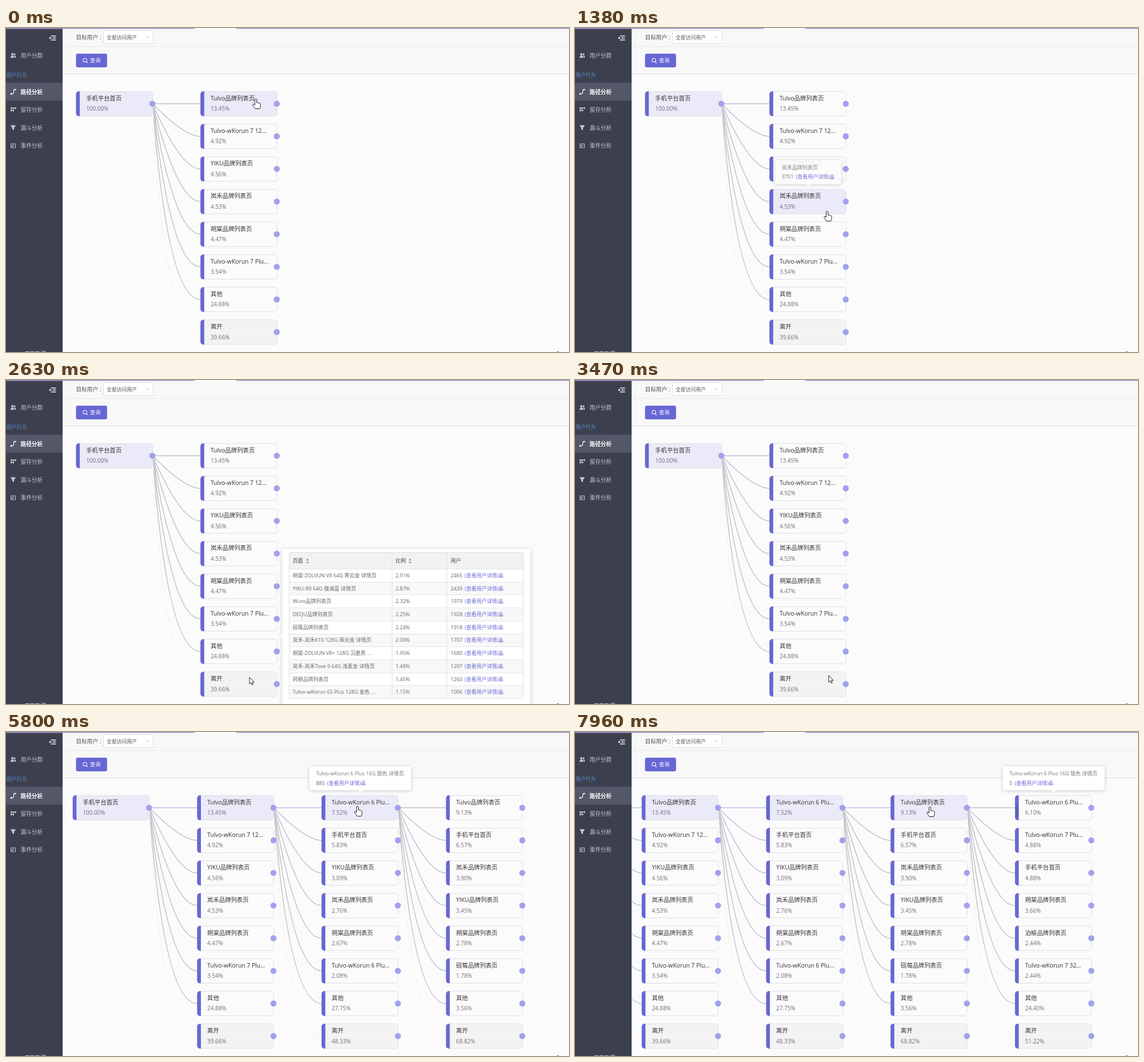
These frames come from a looping animation (985x568 px, 8000 ms). An HTML page with a canvas:

```html
<!DOCTYPE html>
<html lang="zh-CN">
<head>
<meta charset="utf-8">
<title>路径分析</title>
<style>
html, body { margin: 0; width: 100%; height: 100%; overflow: hidden; background: #fbfbfb; }
canvas { display: block; width: 985px; height: 568px; }
</style>
</head>
<body>
<canvas id="stage" width="985" height="568"></canvas>
<script>
const ctx = document.getElementById('stage').getContext('2d');
const LOOP = 8000, PITCH_X = 217.7, PITCH_Y = 57.2, TOP = 111, CARD_W = 134, CARD_H = 43;
const HOVER_LAG = 90, SMALL = 9;
const PURPLE = '#6767d5', DOT = '#a1a1ed', LINK = '#6a6ad8';
const FONT = '"Open Sans", "Noto Sans CJK SC", "Noto Sans CJK", sans-serif';

const list = brand => brand + '品牌列表页';
const HOME = '手机平台首页', A = list('Tulvo'), V = list('YIKU'), H = list('岚禾'), S = list('朔棠'), M = list('砚莓');
const phone = model => 'Tulvo-wKorun ' + model;
const column = (titles, rates) => [...titles, '其他', '离开'].map((title, i) => ({ title, rate: rates.split(' ')[i] + '%' }));
const COLUMNS = [
  [{ title: HOME, rate: '100.00%' }],
  column([A, phone('7 12...'), V, H, S, phone('7 Plu...')], '13.45 4.92 4.56 4.53 4.47 3.54 24.88 39.66'),
  column([phone('6 Plu...'), HOME, V, H, S, phone('6 Plu...')], '7.52 5.83 3.09 2.76 2.67 2.08 27.75 48.33'),
  column([A, HOME, H, V, S, M], '9.13 6.57 3.90 3.45 2.78 1.78 3.56 68.82'),
  column([phone('6 Plu...'), phone('7 Plu...'), HOME, S, list('泊榆'), phone('7 32...')], '6.10 4.88 4.88 3.66 2.44 2.44 24.40 51.22')
];
const SILVER = phone('6 Plus 16G 银色 详情页');

// column, row, title, users, shown from, shown until
const TIPS = [
  [1, 0, A, 9695, 70, 400],
  [1, 1, phone('7 128G 黑色 详情页'), 4074, 520, 900],
  [1, 2, V, 3776, 940, 1150],
  [1, 3, H, 3751, 1160, 1700],
  [1, 4, S, 3702, 1780, 2000],
  [1, 5, phone('7 Plus 128G 黑色 详情页'), 2931, 2040, 2200],
  [1, 3, H, 3751, 4020, 4180],
  [1, 0, A, 9695, 4420, 5060],
  [2, 0, SILVER, 885, 5300, 6190],
  [3, 0, A, 82, 6500, 6900],
  [4, 0, SILVER, 5, 7030, LOOP]
];
const TABLE = [
  ['朔棠-ZOLVUN V8 64G 霁云金 详情页', '2.91%', 2465],
  ['YIKU-R9 64G 微澜蓝 详情页', '2.87%', 2439],
  [list('Wuro'), '2.32%', 1979],
  [list('DEQU'), '2.25%', 1928],
  [M, '2.24%', 1918],
  ['岚禾-岚禾K10 128G 琢光金 详情页', '2.00%', 1707],
  ['朔棠-ZOLVUN V8+ 128G 沉墨黑 ...', '1.95%', 1680],
  ['岚禾-岚禾Tove 9 64G 浅麦金 详情页', '1.48%', 1297],
  [list('珂穆'), '1.45%', 1260],
  [phone('6S Plus 128G 金色 ...'), '1.15%', 1006]
];
const CURSOR = [
  [0, 437, 124], [70, 437, 126], [450, 438, 152], [840, 440, 243], [930, 440, 251], [1380, 441, 321],
  [1700, 440, 356], [2000, 436, 398], [2200, 432, 455], [2420, 428, 500], [2560, 426, 521], [2630, 426, 521],
  [2940, 428, 537], [3050, 428, 537], [3190, 445, 537], [3420, 445, 537], [4260, 425, 222], [4530, 420, 132],
  [5000, 420, 132], [5540, 615, 130], [6140, 615, 130], [6700, 813, 131], [7750, 813, 131], [7940, 621, 131]
];
const HAND = 'M-1.6 1Q0-1 1.6 1V7Q3 6 4 7.2Q6 6.4 6.4 8Q8 7.7 8 9.5V13Q8 15 6.5 17.5H-1Q-3 14-5 11.5Q-6 9.4-4 9L-1.6 11Z';
const ARROW = 'M0 0V12L2.8 9.4 4.6 13.6 6.4 12.8 4.6 8.8H8.2Z';

const clamp = v => Math.max(0, Math.min(1, v));
const fade = (t, on, off) => Math.min(clamp((t - on) / 240), clamp(1 - (t - off) / 180));
const columnCount = t => t < 4720 ? 2 : t < 5800 ? 3 : t < 6890 ? 4 : 5;
const columnX = (t, i) => (t < 5800 ? 122.5 : 116.7) + (i - (t < 6890 ? 0 : 1)) * PITCH_X;
const rowY = r => TOP + r * PITCH_Y;

function cursorAt(t) {
  const next = CURSOR.findIndex(k => k[0] > t);
  if (next < 0) return CURSOR.at(-1).slice(1);
  const a = CURSOR[next - 1], b = CURSOR[next], p = (t - a[0]) / (b[0] - a[0]);
  return [a[1] + (b[1] - a[1]) * p, a[2] + (b[2] - a[2]) * p];
}

function cardAt(t) {
  const [x, y] = cursorAt(t);
  for (let c = 0; c < columnCount(t); c++)
    for (let r = 0; r < COLUMNS[c].length; r++) {
      const dx = x - columnX(t, c), dy = y - rowY(r);
      if (dx >= 0 && dx <= CARD_W && dy >= 0 && dy <= CARD_H) return [c, r];
    }
  return [-1, -1];
}

function rect(x, y, w, h, color) {
  ctx.fillStyle = color;
  ctx.fillRect(x, y, w, h);
}

function box(x, y, w, h, radius, fill, stroke) {
  ctx.beginPath();
  ctx.roundRect(x, y, w, h, radius);
  ctx.fillStyle = fill;
  ctx.fill();
  if (stroke) { ctx.strokeStyle = stroke; ctx.lineWidth = 1; ctx.stroke(); }
}

function path(d, x, y, fill, stroke, width = 1) {
  const p = new Path2D(d);
  ctx.save();
  ctx.translate(x, y);
  if (fill) { ctx.fillStyle = fill; ctx.fill(p); }
  if (stroke) { ctx.strokeStyle = stroke; ctx.lineWidth = width; ctx.stroke(p); }
  ctx.restore();
}

// y is the vertical middle of the line of text
function text(s, x, y, size, color, weight = 400) {
  ctx.font = `${weight} ${size}px ${FONT}`;
  ctx.fillStyle = color;
  ctx.fillText(s, x, y + size * 0.37);
  return ctx.measureText(s).width;
}

function dot(x, y, r, color) {
  ctx.beginPath();
  ctx.arc(x, y, r, 0, Math.PI * 2);
  ctx.fillStyle = color;
  ctx.fill();
}

function userLink(users, x, y) {
  const linkX = x + text(String(users), x, y, SMALL, '#666') + 4;
  const end = linkX + text('(查看用户详情)', linkX, y, SMALL, LINK);
  path('M1.5-3.5h4v2.6h-4zM.5.8h2.6v2.7H.5zM4 .8h2.8v2.7H4z', end + 0.5, y, null, LINK, 0.8);
}

function shadowed(draw) {
  ctx.save();
  ctx.shadowColor = 'rgba(0,0,0,.2)';
  ctx.shadowBlur = 6;
  ctx.shadowOffsetY = 1;
  draw();
  ctx.restore();
}

function drawTip(t, [c, r, title, users, on, off]) {
  const alpha = fade(t, on, off);
  if (!alpha || c >= columnCount(t)) return;
  ctx.save();
  ctx.globalAlpha = alpha;
  ctx.font = `400 ${SMALL}px ${FONT}`;
  const w = Math.max(ctx.measureText(title).width, ctx.measureText(users + '(查看用户详情)').width + 11.5) + 24;
  const mid = columnX(t, c) + CARD_W / 2 + 0.8, x = mid - w / 2, y = rowY(r) - 51;
  shadowed(() => box(x, y, w, 42, 3, '#fff'));
  path('M-4 0H4L0 3.5Z', mid, y + 42, '#fff');
  text(title, x + 11.5, y + 13, SMALL, '#777');
  userLink(users, x + 11.5, y + 29.5);
  ctx.restore();
}

function drawTable(t) {
  const alpha = fade(t, 2300, 2640);
  if (!alpha) return;
  const rowH = 22.7, x = 495, y = 302, w = 410.5, headH = 29;
  ctx.save();
  ctx.globalAlpha = alpha;
  shadowed(() => box(483, 296, 434.5, 290, 3, '#fff'));
  path('M1-4V4L-3 0Z', 482.5, 448, '#fff');
  rect(x, y, w, headH, '#f2f2f4');
  TABLE.forEach(([title, rate, users], i) => {
    const top = y + headH + i * rowH, mid = top + rowH / 2 + 0.3;
    if (i % 2) rect(x, top, w, rowH, '#f8f8f8');
    rect(x, Math.round(top), w, 1, '#e4e5e9');
    text(title, 501.5, mid, SMALL, '#666');
    text(rate, 681.5, mid, SMALL, '#666');
    userLink(users, 778, mid);
  });
  box(x + 0.5, y + 0.5, w - 1, 256, 2, 'transparent', '#dddee3');
  for (const cx of [675, 771]) rect(cx, y, 1, 256, '#e0e1e6');
  text('页面', 501.5, 317, SMALL, '#444');
  text('比例', 681.5, 317, SMALL, '#444');
  text('用户', 778, 317, SMALL, '#444');
  for (const cx of [527.5, 707]) path('M-3-1.2H3L0-4.6ZM-3 1.2H3L0 4.6Z', cx, 317.5, '#999');
  ctx.restore();
}

function drawLinks(t, c) {
  const x0 = columnX(t, c) + CARD_W, y0 = TOP + 21.7, x1 = columnX(t, c + 1);
  COLUMNS[c + 1].forEach((card, r) => {
    const y1 = y0 + r * PITCH_Y, leaving = r === 7, chosen = r === 0 && c + 2 < columnCount(t);
    ctx.beginPath();
    ctx.moveTo(x0, y0);
    ctx.quadraticCurveTo(x1 - 22 - 6 * r, y1, x1, y1);
    ctx.strokeStyle = leaving ? '#fdf0e2' : chosen ? '#bdbdee' : '#bfc1cb';
    ctx.lineWidth = leaving ? 1.1 : 1.5;
    ctx.stroke();
  });
}

function drawCard(x, y, card, active) {
  const fill = active ? '#ebeaf8' : card.title === '离开' ? '#f3f3f3' : '#fbfbfc';
  box(x + 0.5, y + 0.3, CARD_W - 0.5, CARD_H, 5, fill, '#dddfe6');
  box(x, y, 6.6, CARD_H + 0.6, [5, 0, 0, 5], PURPLE);
  text(card.title, x + 17.7, y + 12, 10.35, '#333');
  text(card.rate, x + 17.7, y + 30.5, 9.9, '#707078');
}

function drawCards(t) {
  const count = columnCount(t), [hc, hr] = cardAt(Math.max(0, t - HOVER_LAG));
  for (let c = 0; c < count - 1; c++) drawLinks(t, c);
  for (let c = 0; c < count; c++) {
    const x = columnX(t, c);
    COLUMNS[c].forEach((card, r) => {
      const active = (r === 0 && c < count - 1) || (c === hc && r === hr && r < 7);
      drawCard(x, rowY(r), card, active);
      dot(x + 133.5, rowY(r) + 21.7, 5.3, DOT);
    });
  }
  if (count === 5) path('M1 0H5M2 4H6M1 8H5M2 12H6M1 16H5', columnX(t, 4) + 0.5, 131, null, '#55566e', 2.2);
}

function drawHeader() {
  rect(99, 0, 886, 80, '#f8f8f8');
  rect(99, 32, 886, 1, '#e7e7e9');
  rect(99, 80, 886, 1, '#dfdfe2');
  rect(0, 0, 985, 1.4, '#8f8fdc');
  rect(330, 0, 73, 2, '#fff');
  text('目标用户 :', 122.5, 16.5, 9.7, '#555');
  box(170.5, 4.5, 87, 23, 3, '#fff', '#d9dadf');
  text('全部访问用户', 176, 16.5, 8.8, '#555');
  path('M-2.8-1.4L0 1.4 2.8-1.4', 247, 16, null, '#bbb');
  box(122.5, 45, 54.3, 24, 3, PURPLE);
  path('M3.2 0A3.2 3.2 0 1 1-3.2 0A3.2 3.2 0 1 1 3.2 0M2.3 2.3L4.8 4.8', 138, 56.5, null, '#fff', 1.1);
  text('查询', 147, 57, 9.2, '#fff', 500);
}

function drawSidebar() {
  rect(0, 1.4, 99, 567, '#3c3f4d');
  rect(0, 96, 99, 31.5, '#535768');
  const grey = '#c6c8d0';
  path('M-2-3.5H6.5M0 0H6.5M-2 3.5H6.5', 81, 17.5, null, '#eeeff3', 1.4);
  path('M-2.5-2.6V2.6L-6 0Z', 81, 17.5, '#eeeff3');
  ['用户分群', '路径分析', '留存分析', '漏斗分析', '事件分析'].forEach((label, i) => {
    const y = i ? 80.5 + i * 31.5 : 48.5, on = i === 1;
    text(label, 25.5, y, 9.7, on ? '#fff' : grey, on ? 600 : 400);
  });
  text('用户行为', 1, 82.5, 8.8, '#5e92d8');
  dot(11, 46, 2, grey);
  dot(15, 46.2, 1.6, grey);
  path('M8 4Q8 0 11 0T14 4ZM14.6 3.6H17.4Q17.4 0 14.6 0Z', 0, 48.3, grey);
  path('M-3.5 3.5H-1Q1 3.5 1-.5T3-4H4.5', 12.5, 112, null, '#fff', 1.2);
  dot(9, 115.4, 1.5, '#fff');
  dot(16.4, 108, 1.3, '#fff');
  for (const [x, y] of [[8, 139], [11.5, 139], [15, 139], [8, 143], [11.5, 143]]) rect(x, y, 2.6, 3, grey);
  path('M-4-4H4V-2.5L1.5.5V4.5L-1.5 3V.5L-4-2.5Z', 12.5, 174.5, grey);
  path('M-4-3.5H4V3.5H-4ZM-2-1H2M-2 1.2H.5M-2-1V2', 12.5, 206.5, null, grey);
  text('库存效用', 32.5, 570.5, 9.5, '#e6e7ec');
}

function drawCursor(t) {
  const [x, y] = cursorAt(t), row = cardAt(t)[1];
  path(row >= 0 && row < 7 ? HAND : ARROW, x, y, '#fff', '#222', 1);
}

function draw(now) {
  const t = now % LOOP;
  rect(0, 0, 985, 568, '#fbfbfb');
  drawCards(t);
  drawHeader();
  TIPS.forEach(tip => drawTip(t, tip));
  drawTable(t);
  drawSidebar();
  rect(964, 567, 3, 1, '#666');
  drawCursor(t);
}

const start = performance.now();
function tick() {
  draw(performance.now() - start);
  requestAnimationFrame(tick);
}
tick();
</script>
</body>
</html>
```
